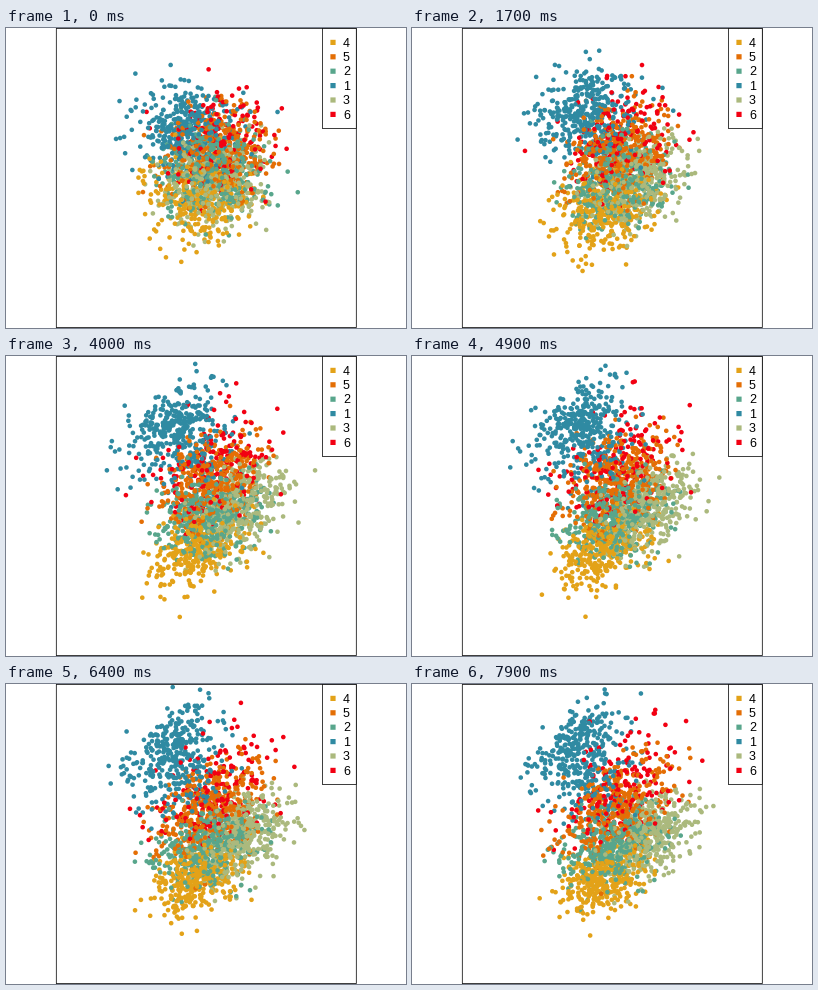
These frames come from a looping animation (400 by 300 pixels, 8 s). A matplotlib script:

```python
import matplotlib.pyplot as plt
import numpy as np
from matplotlib.animation import FuncAnimation
from matplotlib.patches import Rectangle

W, H, DPI = 400, 300, 100
FRAMES, STEP = 80, 100
PX = 72 / DPI
LINE = 0.75 * PX
COLORS = {
    "4": "#E3A218", "5": "#E46E05", "2": "#58A68C",
    "1": "#2F8AA2", "3": "#ABB97D", "6": "#F20012",
}
START_SPREAD = np.array([25, 23])
TURN = 0.3  # radians per second
rng = np.random.default_rng(12)


def ease(t):
    return 1 - np.exp(-t / 2.2)


class Cluster:
    """Gaussian cloud that drifts and reshapes while its latent axes turn."""

    def __init__(self, label, n, start, end, spread, tilt=-0.35):
        self.n, self.color, self.tilt = n, COLORS[label], tilt
        self.start, self.end = np.array(start), np.array(end)
        self.spread = np.array(spread)
        self.latent = rng.standard_normal((2, 2, n))

    def at(self, t):
        k = ease(t)
        angle = TURN * t
        u, v = self.latent[0] * np.cos(angle) + self.latent[1] * np.sin(angle)
        rho = self.tilt * k
        v = rho * u + np.sqrt(1 - rho ** 2) * v
        center = self.start + (self.end - self.start) * k
        scale = START_SPREAD + (self.spread - START_SPREAD) * k
        return center + scale * np.column_stack([u, v])


clusters = [
    Cluster("4", 350, (192, 168), (191, 196), (22, 17)),
    Cluster("5", 390, (212, 125), (204, 126), (26, 25)),
    Cluster("2", 400, (205, 143), (204, 161), (24, 19)),
    Cluster("1", 220, (178, 98), (161, 60), (24, 23), -0.65),
    Cluster("1", 170, (184, 107), (183, 90), (22, 25), 0),
    Cluster("3", 370, (208, 155), (239, 150), (21, 21)),
    Cluster("6", 170, (218, 108), (206, 105), (28, 27)),
]
order = rng.permutation(sum(c.n for c in clusters))
point_colors = np.concatenate([[c.color] * c.n for c in clusters])[order]


def positions(t):
    return np.concatenate([c.at(t) for c in clusters])[order]


fig = plt.figure(figsize=(W / DPI, H / DPI), dpi=DPI, facecolor="white")
ax = fig.add_axes([0, 0, 1, 1])
ax.set(xlim=(0, W), ylim=(H, 0))
ax.axis("off")


def box(x0, y0, x1, y1, fill, z, line=LINE):
    patch = Rectangle((x0, y0), x1 - x0, y1 - y0, facecolor=fill,
                      edgecolor="black", linewidth=line, zorder=z, snap=False)
    ax.add_patch(patch)
    return patch


frame_box = box(50.3, 0.4, 350.3, 299.6, "none", 3)
dots = ax.scatter(*positions(0).T, s=(4.6 * PX) ** 2, c=point_colors,
                  linewidths=0, zorder=2)
dots.set_clip_path(frame_box)

box(316.4, 0.4, 350.3, 100.5, "white", 4)
for i, (label, color) in enumerate(COLORS.items()):
    y = 14.4 * (i + 1)
    box(324.4, y - 2.6, 329.6, y + 2.6, color, 5, line=0)
    ax.text(337, y + 1.2, label, family="Liberation Sans", fontsize=12.5 * PX,
            va="center", zorder=5)


def update(i):
    dots.set_offsets(positions(i * STEP / 1000))
    return [dots]


anim = FuncAnimation(fig, update, frames=FRAMES, interval=STEP,
                     repeat=True, repeat_delay=0)
plt.show()
```
